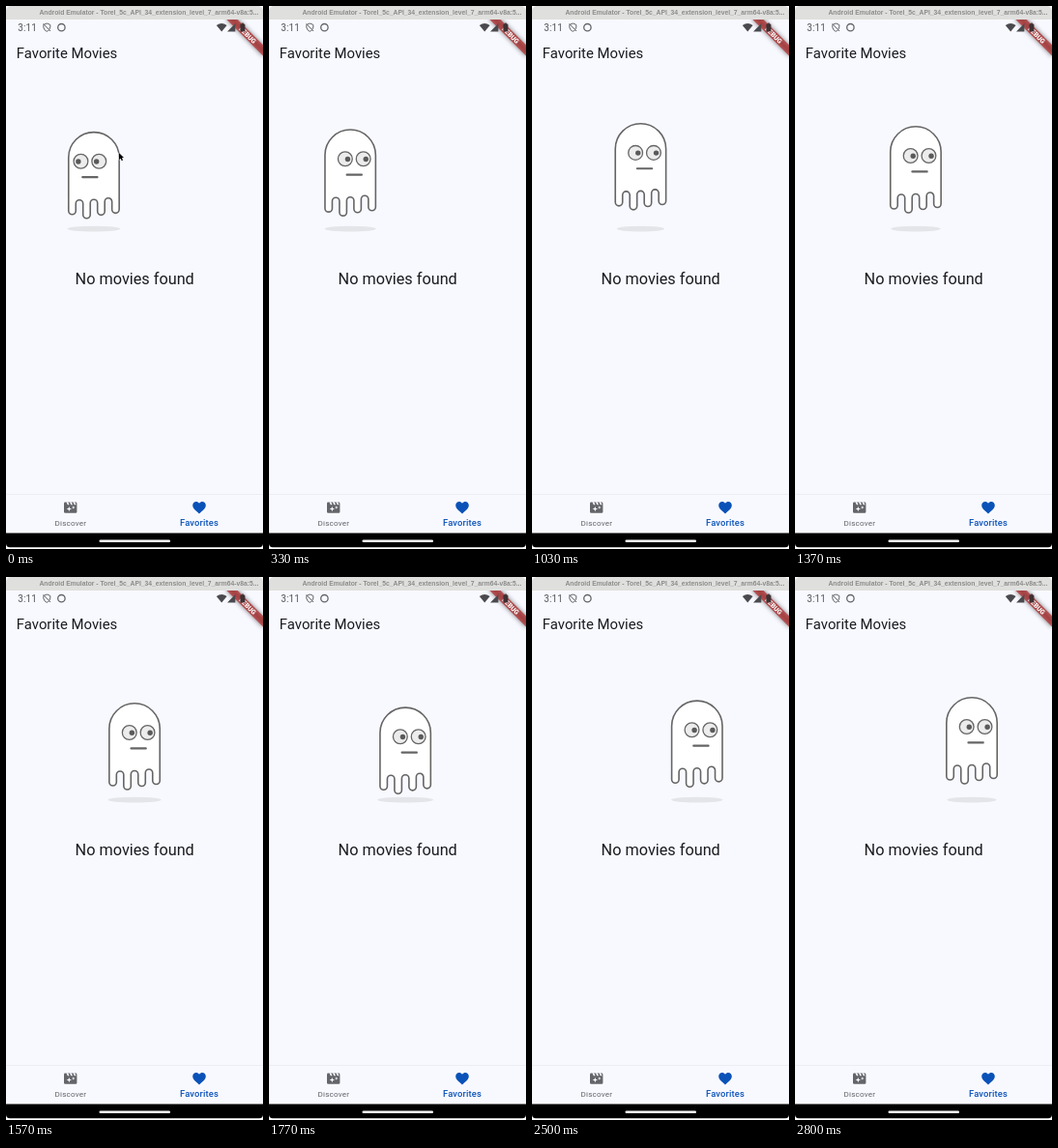
An HTML page with a canvas for the animation above (3800 ms loop, 266 px wide and 562 px high).

```html
<!DOCTYPE html>
<html lang="en">
<head>
<meta charset="utf-8">
<title>Favorite Movies</title>
<style>
html, body { margin: 0; width: 100%; height: 100%; overflow: hidden; background: #fff; }
canvas { display: block; width: 266px; height: 562px; }
</style>
</head>
<body>
<canvas id="stage" width="266" height="562"></canvas>
<script>
const ctx = document.getElementById('stage').getContext('2d');
const LOOP = 3800, MOVE_END = 2800, TURN = 252, CURSOR_END = 100;
const BG = '#f8f9ff', INK = '#1b1c20', GREY = '#646569', BLUE = '#0a52b8', LINE = '#656565';

// [ms, value]: ghost centre x and top y
const PATH_X = [[0, 91], [TURN, 81], [630, 96.1], [1030, 112.4], [1370, 124.9], [1770, 141.1], [2170, 157.3], [2800, 183]];
const PATH_Y = [[0, 130], [630, 125], [1030, 121.1], [1130, 121.1], [1370, 124.2], [1600, 131],
  [1770, 134.5], [1860, 134.3], [2170, 131.2], [2670, 125.6], [2800, 124.2]];

const clamp01 = v => Math.max(0, Math.min(1, v));

function segment(keys, t) {
  let i = 0;
  while (i < keys.length - 2 && t >= keys[i + 1][0]) i++;
  return i;
}

function linear(keys, t) {
  const i = segment(keys, t), [t0, a] = keys[i], [t1, b] = keys[i + 1];
  return a + (b - a) * clamp01((t - t0) / (t1 - t0));
}

function smooth(keys, t) {
  const i = segment(keys, t), [t0, a] = keys[i], [t1, b] = keys[i + 1];
  const slope = k => {
    const p = keys[Math.max(0, k - 1)], q = keys[Math.min(keys.length - 1, k + 1)];
    return (q[1] - p[1]) / (q[0] - p[0]);
  };
  const d = t1 - t0, u = clamp01((t - t0) / d), v = 1 - u;
  return a * v * v * (1 + 2 * u) + b * u * u * (3 - 2 * u) + d * u * v * (slope(i) * v - slope(i + 1) * u);
}

function text(str, x, y, font, color, align = 'left', spacing = 0) {
  ctx.font = font;
  ctx.fillStyle = color;
  ctx.textAlign = align;
  ctx.letterSpacing = spacing + 'px';
  ctx.fillText(str, x, y);
}

function rect(x, y, w, h, color, r = 0) {
  ctx.fillStyle = color;
  ctx.beginPath();
  ctx.roundRect(x, y, w, h, r);
  ctx.fill();
}

function ellipse(x, y, rx, ry, fill, stroke, width) {
  ctx.beginPath();
  ctx.ellipse(x, y, rx, ry, 0, 0, Math.PI * 2);
  if (fill) { ctx.fillStyle = fill; ctx.fill(); }
  if (stroke) { ctx.strokeStyle = stroke; ctx.lineWidth = width; ctx.stroke(); }
}

function stroke(points, color, width) {
  ctx.beginPath();
  points.forEach(([x, y]) => ctx.lineTo(x, y));
  ctx.strokeStyle = color;
  ctx.lineWidth = width;
  ctx.stroke();
}

function shape(points, color) {
  ctx.beginPath();
  points.forEach(([x, y]) => ctx.lineTo(x, y));
  ctx.closePath();
  ctx.fillStyle = color;
  ctx.fill();
}

function titleBar() {
  rect(0, 0, 266, 14, '#dfdfdd', [5, 5, 0, 0]);
  text('Android Emulator - Torel_5c_API_34_extension_level_7_arm64-v8a:5...', 34.5, 9.3,
    'bold 6.75px "Liberation Sans", Arial, sans-serif', '#8b8b8a');
}

function debugBanner() {
  ctx.save();
  ctx.beginPath();
  ctx.rect(0, 14, 266, 531);
  ctx.clip();
  ctx.translate(266, 14);
  ctx.rotate(Math.PI / 4);
  ctx.save();
  ctx.filter = 'blur(2.5px)';
  rect(-27, 18.6, 54, 8, 'rgba(0,0,0,.5)');
  ctx.restore();
  rect(-27, 18.6, 54, 8, 'rgba(183,28,28,.63)');
  text('DEBUG', 0, 25, '900 6.8px Roboto, sans-serif', '#fff', 'center');
  ctx.restore();
}

function statusBar() {
  text('3:11', 12.2, 26, '10px Roboto, sans-serif', '#56575b', 'left', 0.1);
  ctx.beginPath();
  ctx.moveTo(42.3, 18);
  ctx.lineTo(45.8, 19.4);
  ctx.lineTo(45.8, 22);
  ctx.quadraticCurveTo(45.4, 25.2, 42.3, 26.4);
  ctx.quadraticCurveTo(39.2, 25.2, 38.8, 22);
  ctx.lineTo(38.8, 19.4);
  ctx.closePath();
  ctx.strokeStyle = GREY;
  ctx.lineWidth = 1;
  ctx.stroke();
  stroke([[38.6, 18.4], [46, 26]], GREY, 1);
  ellipse(57.4, 22.2, 3.7, 3.7, null, GREY, 1.3);

  const dark = '#4a4a4e';
  ctx.beginPath();
  ctx.moveTo(223.2, 26.6);
  ctx.lineTo(217.8, 20);
  ctx.quadraticCurveTo(223.2, 16, 228.6, 20);
  ctx.closePath();
  ctx.fillStyle = dark;
  ctx.fill();
  shape([[229, 26.4], [237.4, 26.4], [237.4, 18]], dark);
  rect(242.4, 18.6, 5, 8, '#3f3033', 0.8);
  rect(243.8, 17.6, 2.2, 1.2, '#3f3033');
}

function clapper() {
  rect(60, 513.6, 13.4, 11.2, GREY, 1.3);
  for (let i = 0; i < 3; i++) {
    const x = 62.4 + i * 3.5;
    shape([[x, 513.2], [x + 1.8, 513.2], [x + 3.1, 516.2], [x + 1.4, 516.2]], BG);
  }
  const star = (x, y, r) => shape([...Array(8).keys()].map(i => {
    const d = i % 2 ? r * 0.38 : r, a = i * Math.PI / 4;
    return [x + d * Math.cos(a), y + d * Math.sin(a)];
  }), BG);
  star(65.3, 520.6, 2.7);
  star(69.8, 519, 1.8);
}

function heart() {
  ctx.beginPath();
  ctx.moveTo(200, 525.4);
  ctx.bezierCurveTo(195.5, 521.4, 193.2, 519.6, 193.2, 516.7);
  ctx.bezierCurveTo(193.2, 512.6, 198, 511.6, 200, 514.7);
  ctx.bezierCurveTo(202, 511.6, 206.8, 512.6, 206.8, 516.7);
  ctx.bezierCurveTo(206.8, 519.6, 204.5, 521.4, 200, 525.4);
  ctx.fillStyle = BLUE;
  ctx.fill();
}

function navBar() {
  rect(0, 505, 266, 1, '#ecedf2');
  clapper();
  text('Discover', 66.8, 538, '8.1px Roboto, sans-serif', GREY, 'center', 0.17);
  heart();
  text('Favorites', 200, 537.7, '500 9.4px Roboto, sans-serif', BLUE, 'center', 0.15);
  rect(0, 545.4, 266, 14.8, '#000', [0, 0, 4, 4]);
  rect(96.5, 552.4, 73.5, 2.6, '#fff', 1.3);
}

function bodyPath() {
  const half = 26.2, r = half / 7;
  const legs = [82, 86, 82.6, 80.6], notches = [74.5, 74, 72.5];
  ctx.beginPath();
  ctx.arc(0, half + 0.6, half, Math.PI, 0);
  for (let i = 3; i >= 0; i--) {
    const x = -half + r + i * 4 * r;
    ctx.lineTo(x + r, legs[i]);
    ctx.arc(x, legs[i], r, 0, Math.PI);
    if (i) {
      ctx.lineTo(x - r, notches[i - 1]);
      ctx.arc(x - 2 * r, notches[i - 1], r, 0, Math.PI, true);
    }
  }
  ctx.closePath();
}

function ghost(t) {
  const x = linear(PATH_X, t), y = smooth(PATH_Y, t);
  const look = 2 * clamp01((t - TURN + 60) / 120) - 1;
  ellipse(x, 230.6, 24.7 + (y - 121) * 0.32, 2.9, '#e4e5e8');
  ctx.save();
  ctx.translate(x, y);
  ctx.lineJoin = 'round';
  bodyPath();
  ctx.fillStyle = '#fff';
  ctx.fill();
  ctx.strokeStyle = LINE;
  ctx.lineWidth = 1.6;
  ctx.stroke();
  ctx.translate(4.1 * look, 0);
  for (const side of [-9.4, 9.4]) {
    ellipse(side, 30.8, 7.4, 7.4, '#ececec', LINE, 1.3);
    ellipse(side + 2.6 * look, 31, 2.7, 2.7, '#5a5a5a');
  }
  rect(-8.7, 46.1, 17.4, 2.1, LINE, 1);
  ctx.restore();
}

function cursor() {
  const arrow = [[117, 152], [117, 159.2], [118.6, 157.7], [119.8, 160.2], [121, 159.6], [119.9, 157.2], [122, 157.1]];
  stroke([...arrow, arrow[0]], '#fff', 1);
  shape(arrow, '#000');
}

function draw(t) {
  rect(0, 0, 266, 562, '#fff');
  rect(0, 14, 266, 532, BG);
  titleBar();
  debugBanner();
  statusBar();
  text('Favorite Movies', 10.8, 54, '14.9px Roboto, sans-serif', INK);
  text('No movies found', 133.2, 288.2, '16.25px Roboto, sans-serif', INK, 'center');
  navBar();
  ghost(Math.min(t, MOVE_END));
  if (t < CURSOR_END) cursor();
}

const start = performance.now();
function tick() {
  draw((performance.now() - start) % LOOP);
  requestAnimationFrame(tick);
}
tick();
</script>
</body>
</html>
```
